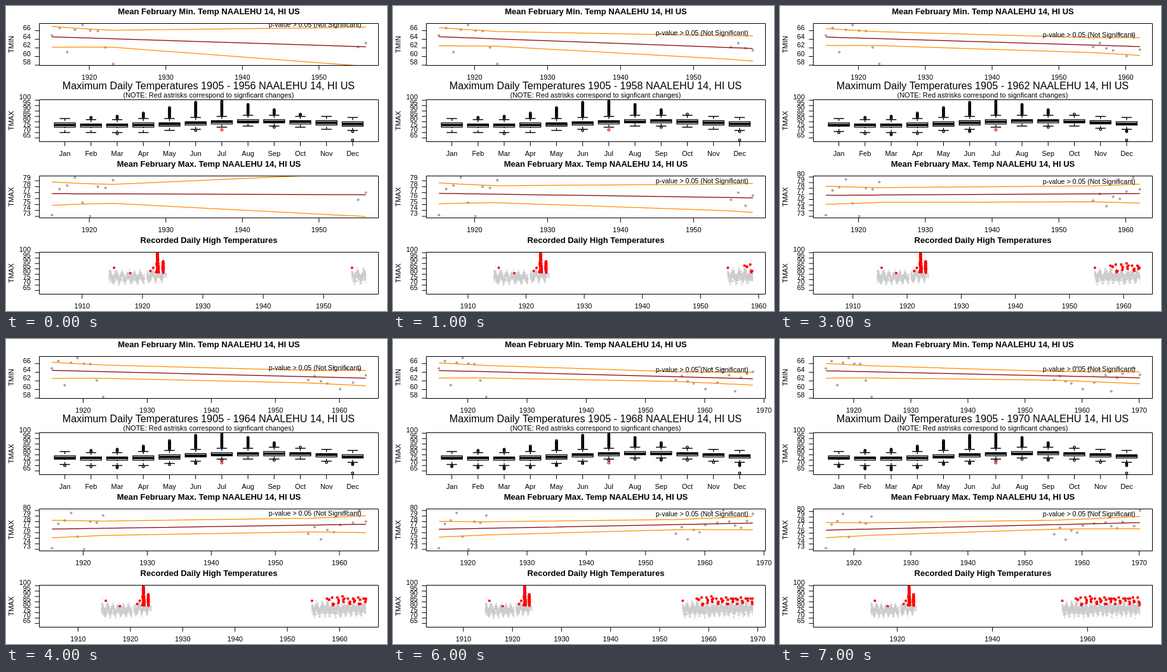
Write an HTML page that moves like this. It is 600 by 480 pixels and loops after 8000 ms.

```html
<!DOCTYPE html>
<html lang="en">
<head>
<meta charset="utf-8">
<title>Temperature record</title>
<style>
html, body { margin: 0; width: 100%; height: 100%; overflow: hidden; background: #fff; }
svg { display: block; font: 11px "Liberation Sans", Arial, sans-serif; }
.title { font-size: 13px; font-weight: bold; }
.big { font-size: 16.2px; }
.pval { font-size: 10.6px; }
path { fill: none; stroke: #000; }
.fit { stroke: #8b0000; stroke-width: 1.25; }
.band { stroke: #ff8c00; stroke-width: 1.25; }
.days { stroke: #ccc; stroke-width: 1.7; stroke-linecap: round; }
</style>
</head>
<body>
<svg id="stage" width="600" height="480" viewBox="0 0 600 480">
<defs>
<clipPath id="clip0"><rect x="52.5" y="27" width="534" height="67"/></clipPath>
<clipPath id="clip2"><rect x="52.5" y="267" width="534" height="67"/></clipPath>
</defs>
</svg>
<script>
const stage = document.getElementById('stage');
const STEP = 1000, FIRST = 1956, COUNT = 8;
const L = 52.5, R = 586.5, H = 66, MID = 319.5;
const PLACE = 'NAALEHU 14, HI US';
const MONTHS = 'Jan Feb Mar Apr May Jun Jul Aug Sep Oct Nov Dec'.split(' ');

// February means: nine years from 1915, then 1955 onward
const TMIN = [64.9, 66.6, 61, 66.2, 67.3, 66, 65.9, 62.1, 58.3, 62.2, 63.1, 61.9, 61.4,
  65.2, 60.1, 64.9, 61.6, 64.7, 63.3, 59.6, 62.7, 63.7, 64.1, 64.9, 63.4];
const TMAX = [73.2, 77.6, 78.2, 79.55, 75.3, 73, 78, 77.8, 79.1, 75.8, 77, 74.8, 76.5,
  76.1, 77.4, 79.9, 77.8, 80, 78, 77.3, 76.9, 78.1, 79.4, 77.3, 80.2];
const FEB = .12;
const yearOf = i => (i < 9 ? 1915 : 1946) + i + FEB;

let seed = 7;
const rnd = () => (seed = (seed * 16807) % 2147483647) / 2147483647;
const bell = () => (rnd() + rnd() + rnd() + rnd() - 2) * 1.73;

// Record highs: a few early ones, two hot spells, then some late in each year
const HIGHS = [[1915.3, 86], [1918, 81], [1921.3, 83], [1921.8, 86], [1954.7, 86]];
for (let v = 82; v <= 99; v++) {
  const spread = .06 + (99 - v) * .025;
  for (let i = 0; i < 4; i++) HIGHS.push([1922.48 + spread * (rnd() - .45), v]);
  if (v <= 92) HIGHS.push([1923.3 + .15 * rnd(), v], [1923.4 + .1 * rnd(), v - .5]);
}
for (let y = 1957; y < 1971; y++) {
  HIGHS.push([y + .55, 88 + Math.round(2 * rnd())]);
  for (let i = 0; i < 3; i++) HIGHS.push([y + .7 + .3 * rnd(), 82 + Math.round(6 * rnd())]);
}

// Daily readings: a yearly wave with noise
const DAYS = [[1914.95, 63], [1914.7, 88]];
for (let t = 1914.45; t < 1971; t += 2 / 365) {
  if (t > 1924) t = Math.max(t, 1954.65);
  if (t > 1920.35 && t < 1920.7) continue;
  const late = t > 1950;
  const base = late ? 78 + (t - 1955) * .07 : t > 1921 ? 79 : 77.2;
  const v = base + 2.3 * Math.cos(2 * Math.PI * (t - .65)) + bell() * (late ? 2.6 : 2);
  if (late || t < 1923.5 || rnd() < .25) DAYS.push([t, Math.round(v)]);
}

function add(parent, tag, attrs, text) {
  const el = document.createElementNS('http://www.w3.org/2000/svg', tag);
  for (const k in attrs) el.setAttribute(k, attrs[k]);
  if (text !== undefined) el.textContent = text;
  return parent.appendChild(el);
}
const label = (g, x, y, s, cls = '', anchor = 'middle') =>
  add(g, 'text', { x, y, 'text-anchor': anchor, class: cls }, s);
const path = (g, d, width = 1, extra = {}) => add(g, 'path', { d, 'stroke-width': width, ...extra });
const dot = (g, x, y, fill) => add(g, 'circle', { cx: x, cy: y, r: 2.1, fill });

// Data range widened by 4% on each side
const scale = (from, size, a, b) => v => from + size * (.04 + (v - a) / (b - a)) / 1.08;
const scaleX = (a, b) => scale(L, R - L, a, b);
const scaleY = (top, a, b) => scale(top + H, -H, a, b);

function frame(g, top, name, y, step) {
  path(g, `M${L} ${top}H${R}V${top + H}H${L}Z`);
  for (let v = 50; v <= 100; v += step) {
    const p = y(v);
    if (p < top || p > top + H) continue;
    path(g, `M${L} ${p}h-7`);
    label(g, 39, p - .8, v, '', 'end');
  }
  add(g, 'text', { transform: `translate(11.5 ${top + H / 2}) rotate(-90)`, 'text-anchor': 'middle' }, name);
}

function xTick(g, top, x, text) {
  path(g, `M${x} ${top + H}v7`);
  label(g, x, top + 88.5, text);
}

function yearAxis(g, top, x, step) {
  for (let v = 1900; v <= 1980; v += step)
    if (x(v) >= L && x(v) <= R) xTick(g, top, x(v), v);
}

// Least squares line with its 95% band
function fit(xs, ys) {
  const n = xs.length, sum = f => xs.reduce((s, _, i) => s + f(i), 0);
  const mx = sum(i => xs[i]) / n, my = sum(i => ys[i]) / n;
  const sxx = sum(i => (xs[i] - mx) ** 2);
  const slope = sum(i => (xs[i] - mx) * (ys[i] - my)) / sxx;
  const line = x => my + slope * (x - mx);
  const df = n - 2, s = Math.sqrt(sum(i => (ys[i] - line(xs[i])) ** 2) / df);
  const t = 1.96 + 2.37 / df + 2.8 / df ** 2;
  return { line, band: x => t * s * Math.sqrt(1 / n + (x - mx) ** 2 / sxx) };
}

function trendPanel(g, panel, kind, data, year, step) {
  const top = 27.5 + 120 * panel;
  const vals = data.slice(0, year - 1945), years = vals.map((_, i) => yearOf(i));
  const x = scaleX(1915 + FEB, year + FEB), y = scaleY(top, Math.min(...vals), Math.max(...vals));
  const { line, band } = fit(years, vals);
  const upper = t => line(t) + band(t), lower = t => line(t) - band(t);
  const inner = add(g, 'g', { 'clip-path': `url(#clip${panel})` });
  const curve = (f, cls) =>
    add(inner, 'path', { d: 'M' + years.map(t => x(t) + ' ' + y(f(t))).join('L'), class: cls });
  vals.forEach((v, i) => dot(inner, x(years[i]), y(v), '#a9a9a9'));
  curve(line, 'fit');
  curve(upper, 'band');
  curve(lower, 'band');
  label(inner, 559.5, y(upper(year + FEB)) - .5, 'p-value > 0.05 (Not Significant)', 'pval', 'end');
  frame(g, top, 'T' + kind.toUpperCase(), y, step);
  yearAxis(g, top, x, 10);
  label(g, MID, top - 14.5, `Mean February ${kind}. Temp ${PLACE}`, 'title');
}

// Summary of one month: a seasonal wave that warms over the years
function monthStats(m, k) {
  const wave = Math.cos(2 * Math.PI * (m - 7.6) / 12);
  const mid = 78.5 + 1.9 * wave + k * (.6 + .6 * wave);
  const q1 = Math.round(mid - 1.8), q3 = Math.round(mid + 1.5);
  return {
    q1, q3, med: Math.round(mid),
    lo: Math.round(q1 - 4 + wave), hi: q3 + 4,
    hottest: Math.round(83 + 16 * Math.exp(-(((m - 5.8) / 2.6) ** 2))),
    cold: (m % 3 === 2) + Math.round(k * (1.6 - wave))
  };
}

function boxPanel(g, year) {
  const top = 147.5, y = scaleY(top, 63, 99), k = (year - FIRST) / 14;
  MONTHS.forEach((name, m) => {
    const s = monthStats(m, k), c = scaleX(.5, 12.5)(m + 1) - .2;
    const ring = (v, stroke = '#000') =>
      add(g, 'circle', { cx: c, cy: y(v), r: 1.7, fill: 'none', stroke, 'stroke-width': 1.4 });
    const bar = (v, half, width) => path(g, `M${c - half} ${y(v)}h${2 * half}`, width);
    path(g, `M${c} ${y(s.lo)}V${y(s.q1)}M${c} ${y(s.hi)}V${y(s.q3)}`, 1.3, { 'stroke-dasharray': '4 3' });
    bar(s.lo, 8.2, 1.4);
    bar(s.hi, 8.2, 1.4);
    path(g, `M${c - 16.5} ${y(s.q1)}h33V${y(s.q3)}h-33Z`, 1.3);
    bar(s.med, 16.5, 3.6);
    for (let v = s.hi + 1; v <= s.hottest; v++) ring(v);
    for (let i = 1; i <= s.cold; i++) ring(s.lo - i);
    if (name === 'Jul') ring(72.5, '#f00');
    if (name === 'Dec') ring(63);
    xTick(g, top, c, name);
  });
  frame(g, top, 'TMAX', y, 5);
  label(g, 319, 131.3, `Maximum Daily Temperatures 1905 - ${year} ${PLACE}`, 'big');
  label(g, 319, 144.3, '(NOTE: Red astrisks correspond to signficant changes)');
}

function dailyPanel(g, year) {
  const top = 387.5, x = scaleX(1905, year + 1), y = scaleY(top, 63, 99);
  const seen = list => list.filter(p => p[0] < year + 1);
  const d = seen(DAYS).map(([t, v]) => `M${x(t).toFixed(1)} ${y(v).toFixed(1)}h.01`).join('');
  add(g, 'path', { d, class: 'days' });
  for (const [t, v] of seen(HIGHS)) dot(g, x(t), y(v), '#f00');
  frame(g, top, 'TMAX', y, 5);
  yearAxis(g, top, x, year > 1968 ? 20 : 10);
  label(g, MID, top - 14.5, 'Recorded Daily High Temperatures', 'title');
}

const views = Array.from({ length: COUNT }, (_, i) => {
  const g = add(stage, 'g', { display: 'none' }), year = FIRST + 2 * i;
  trendPanel(g, 0, 'Min', TMIN, year, 2);
  boxPanel(g, year);
  trendPanel(g, 2, 'Max', TMAX, year, 1);
  dailyPanel(g, year);
  return g;
});

let shown = -1;
const start = performance.now();
function tick(now) {
  const i = Math.floor(Math.max(0, now - start) / STEP) % COUNT;
  if (i !== shown) {
    views.forEach((g, n) => g.setAttribute('display', n === i ? 'inline' : 'none'));
    shown = i;
  }
  requestAnimationFrame(tick);
}
tick(start);
</script>
</body>
</html>
```
